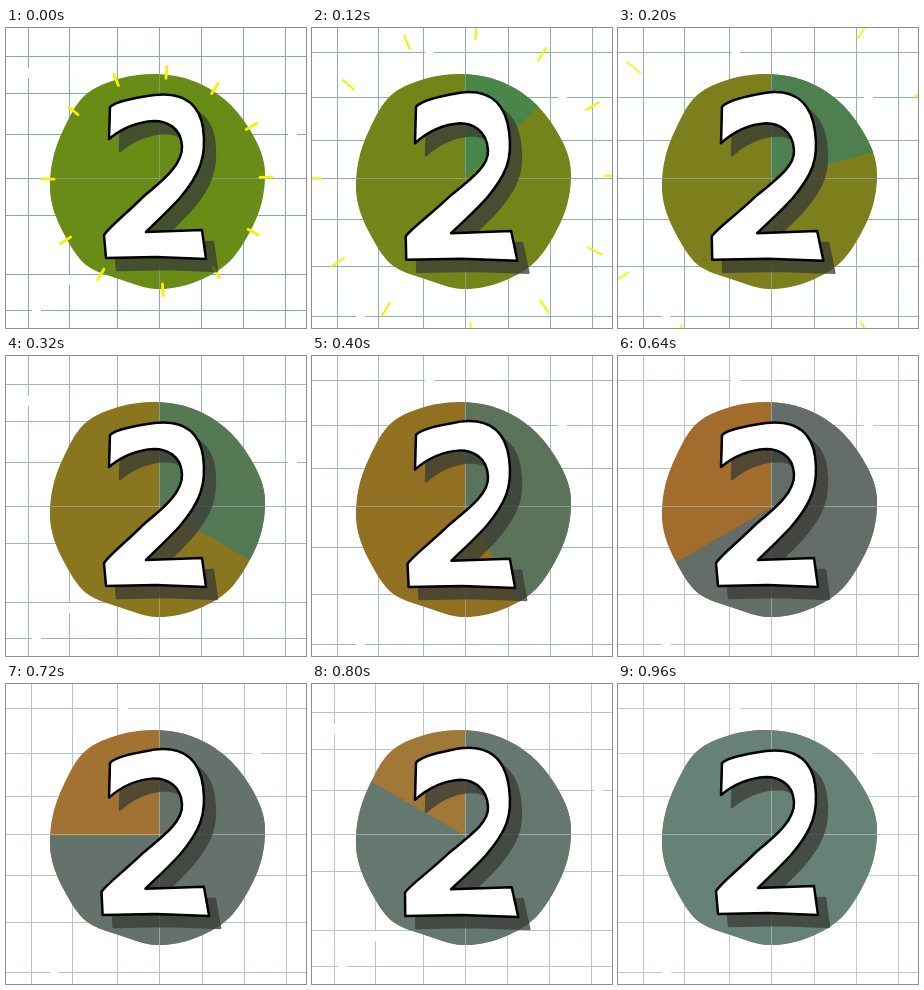
Animation of 300x300 px, one loop 1 s. Source, as an HTML page with a canvas:

```html
<!DOCTYPE html>
<html lang="en">
<head>
<meta charset="utf-8">
<title>Countdown 2</title>
<style>
html, body { margin: 0; width: 100%; height: 100%; overflow: hidden; background: #fff; }
canvas { display: block; width: 300px; height: 300px; }
</style>
</head>
<body>
<canvas id="stage" width="300" height="300"></canvas>
<script>
const SIZE = 300, STEP = 40, STEPS = 25, TURN = Math.PI * 2;
const ctx = document.getElementById('stage').getContext('2d');
const layer = document.createElement('canvas');
layer.width = layer.height = SIZE;
const ink = layer.getContext('2d');

// each colour runs from start to middle to end
const MIDDLE = 14;
const REST_TONE = [[104, 140, 22], [162, 102, 38], [160, 132, 66]];
const SWEPT_TONE = [[64, 142, 66], [100, 104, 100], [102, 130, 118]];
const LINE_TONE = [[130, 172, 186], [178, 192, 192], [192, 206, 200]];

// distance of the disc's rim from its middle, clockwise from the top
const RIM = [107, 106.5, 106, 106, 108.5, 107, 106, 108.5, 108,
  108, 105, 110, 107, 107.5, 106.5, 107, 112, 109];

// two hand-drawn grids; gaps are points where the lines break
const GRIDS = [
  { v: [22, 63, 111, 153, 195, 237, 279], h: [28, 65, 106, 150, 187, 246, 282],
    gaps: [[22, 45], [63, 252], [286, 106], [30, 282]] },
  { v: [25, 66, 111, 153, 196, 238, 280], h: [24, 69, 112, 150, 191, 238, 288],
    gaps: [[117, 24], [48, 288], [250, 70]] }
];

// directions of the sparks, in degrees clockwise from the top
const SPARKS = [5, 32, 60, 88, 118, 147, 177, 211, 237, 271, 310, 338];

const NUMERAL = [
  ['M', 104, 79],
  ['C', 110, 73, 130, 70, 148, 67],
  ['C', 175, 64, 193, 74, 197, 100],
  ['C', 201, 128, 194, 147, 173, 171],
  ['C', 160, 185, 150, 194, 140, 204],
  ['L', 196, 202], ['L', 200, 231], ['L', 150, 229], ['L', 100, 230], ['L', 98, 207],
  ['C', 104, 198, 118, 188, 138, 168],
  ['C', 160, 150, 177, 135, 176, 118],
  ['C', 175, 99, 160, 93, 148, 93],
  ['C', 130, 94, 115, 101, 103, 111]
];

const rgb = c => `rgb(${c.map(Math.round).join(',')})`;
const polar = (deg, r) => {
  const a = deg / 360 * TURN;
  return [151 + Math.sin(a) * r, 153 - Math.cos(a) * r];
};

function tone([first, mid, last], n) {
  const early = n < MIDDLE;
  const [a, b] = early ? [first, mid] : [mid, last];
  const k = early ? n / MIDDLE : (n - MIDDLE) / (STEPS - 1 - MIDDLE);
  return rgb(a.map((c, i) => c + (b[i] - c) * k));
}

// a closed curve through evenly turned points
function makeDisc() {
  const pts = RIM.map((r, i) => polar(i * 360 / RIM.length, r));
  const at = i => pts[(i + pts.length) % pts.length];
  const path = new Path2D();
  path.moveTo(...at(0));
  pts.forEach((p, i) => {
    const before = at(i - 1), next = at(i + 1), after = at(i + 2);
    path.bezierCurveTo(
      p[0] + (next[0] - before[0]) / 6, p[1] + (next[1] - before[1]) / 6,
      next[0] - (after[0] - p[0]) / 6, next[1] - (after[1] - p[1]) / 6, ...next);
  });
  path.closePath();
  return path;
}
const disc = makeDisc();

// widens the foot and thickens the arch
function warp(x, y, s) {
  const low = Math.max(0, (y - 150) / 80);
  const arch = y < 150 ? 5 * Math.sin((y - 80) / 70 * Math.PI) : 0;
  return [x + s * low * 0.13 * (x - 152), y + s * (arch + 2 * low)];
}

function numeral(s) {
  const parts = NUMERAL.map(([kind, ...p]) => {
    const out = [];
    for (let i = 0; i < p.length; i += 2) out.push(...warp(p[i], p[i + 1], s));
    return kind + out.join(' ');
  });
  return new Path2D(parts.join('') + 'Z');
}

function drawGrid(n) {
  const phase = n % 13 % 8;
  const { v, h, gaps } = GRIDS[phase >= 2 && phase <= 5 ? 1 : 0];
  ctx.fillStyle = tone(LINE_TONE, n);
  v.forEach(x => ctx.fillRect(x, 0, 1, SIZE));
  h.forEach(y => ctx.fillRect(0, y, SIZE, 1));
  ctx.fillStyle = '#fff';
  gaps.forEach(([x, y]) => ctx.fillRect(x - 4, y - 5, 9, 10));
}

function drawDisc(n) {
  const cx = 153, cy = 151.5, top = -TURN / 4;
  ctx.save();
  ctx.clip(disc);
  ctx.fillStyle = tone(REST_TONE, n);
  ctx.fillRect(0, 0, SIZE, SIZE);
  ctx.fillStyle = tone(SWEPT_TONE, n);
  ctx.beginPath();
  ctx.moveTo(cx, cy);
  ctx.arc(cx, cy, 160, top, top + TURN * n / (STEPS - 1));
  ctx.fill();
  ctx.globalAlpha = 0.6;
  ctx.fillStyle = tone(LINE_TONE, n);
  ctx.fillRect(153, 0, 1, SIZE);
  ctx.fillRect(0, 150, SIZE, 1);
  ctx.restore();
}

function drawSparks(n) {
  if (n > 7) return;
  const r = 109 + 13 * n;
  ctx.strokeStyle = '#f8f000';
  ctx.lineWidth = 2.8 - n * 0.25;
  ctx.lineCap = 'round';
  for (const deg of SPARKS) {
    ctx.beginPath();
    ctx.moveTo(...polar(deg, r - 6));
    ctx.lineTo(...polar(deg, r + 6 + n));
    ctx.stroke();
  }
}

function inkNumeral(path, fill, line) {
  ink.clearRect(0, 0, SIZE, SIZE);
  ink.lineJoin = 'round';
  ink.lineWidth = 2.5;
  ink.fillStyle = fill;
  ink.strokeStyle = line;
  ink.fill(path);
  ink.stroke(path);
}

function drawNumeral(n) {
  const path = numeral(Math.sin(Math.PI * n / 8) ** 2);
  const shade = 'rgb(58,60,54)';
  inkNumeral(path, shade, shade);
  ctx.globalAlpha = 0.76;
  ctx.drawImage(layer, 11, 12);
  ctx.globalAlpha = 1;
  inkNumeral(path, '#fff', '#000');
  ctx.drawImage(layer, 0, 0);
}

function draw(n) {
  ctx.fillStyle = '#fff';
  ctx.fillRect(0, 0, SIZE, SIZE);
  drawGrid(n);
  drawDisc(n);
  drawSparks(n);
  drawNumeral(n);
}

const start = performance.now();
function tick() {
  const t = Math.max(0, performance.now() - start) % (STEP * STEPS);
  draw(Math.floor(t / STEP));
  requestAnimationFrame(tick);
}
tick();
</script>
</body>
</html>
```
